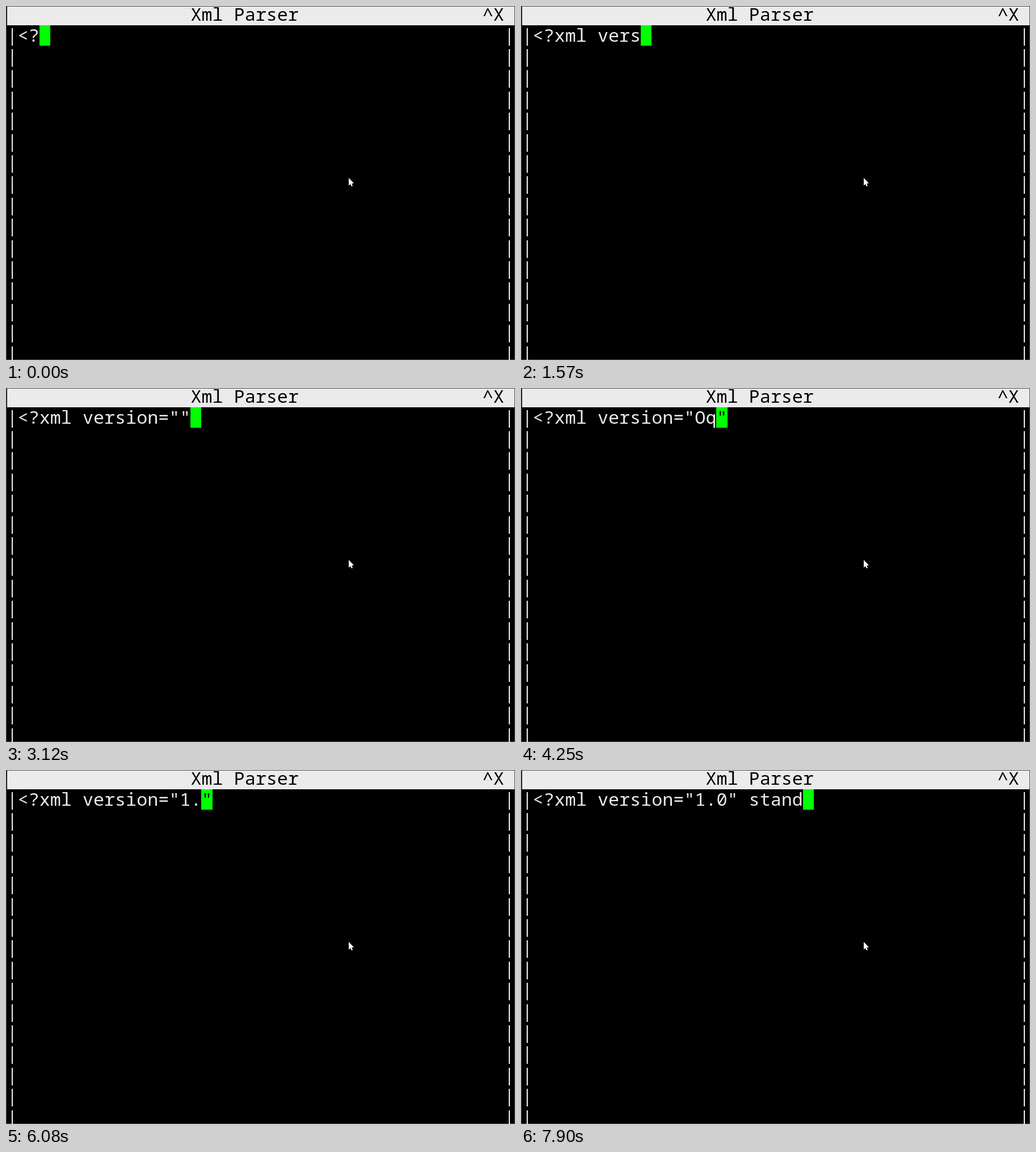
An HTML page with a canvas that plays this animation: 897 by 624 pixels, repeating every 8000 ms.

```html
<!DOCTYPE html>
<html lang="en">
<head>
<meta charset="utf-8">
<title>Xml Parser</title>
<style>
  html, body { margin: 0; width: 100%; height: 100%; overflow: hidden; background: #000; }
  canvas { display: block; }
</style>
</head>
<body>
<canvas id="stage" width="897" height="624"></canvas>
<script>
const ctx = document.getElementById('stage').getContext('2d', { alpha: false });
const LOOP = 8000;
const FONT_SIZE = 31.75;
const CELL_W = FONT_SIZE * 0.6;
const CELL_H = 37.4;
const LEFT = 20.6;
const BASELINE = 25.6;
const HIDDEN = -1;

// [start time, typed text, cursor column]
const states = [
  [0, '<?', 2],
  [430, '<?x', HIDDEN],
  [580, '<?xm', 4],
  [710, '<?xml', 5],
  [860, '<?xml ', HIDDEN],
  [990, '<?xml ', 6],
  [1140, '<?xml v', 7],
  [1270, '<?xml ve', 8],
  [1410, '<?xml ver', 9],
  [1570, '<?xml vers', 10],
  [1730, '<?xml versio', HIDDEN],
  [1880, '<?xml versio', 12],
  [2030, '<?xml version', 13],
  [2570, '<?xml version=', 14],
  [3120, '<?xml version=""', 16],
  [3540, '<?xml version=""', 15],
  [4110, '<?xml version="Oq', HIDDEN],
  [4250, '<?xml version="Oq"', 17],
  [4530, '<?xml version="Oq."', 18],
  [5250, '<?xml version="Oq"', 17],
  [5380, '<?xml version=""', 15],
  [5930, '<?xml version="1', HIDDEN],
  [6080, '<?xml version="1."', 17],
  [6210, '<?xml version="1.0"', 18],
  [6780, '<?xml version="1.0"', 19],
  [6910, '<?xml version="1.0" ', HIDDEN],
  [7040, '<?xml version="1.0" ', 20],
  [7450, '<?xml version="1.0" s', 21],
  [7600, '<?xml version="1.0" sta', 23],
  [7740, '<?xml version="1.0" stan', 24],
  [7900, '<?xml version="1.0" stand', 25]
];

const columnX = col => LEFT + col * CELL_W;

function rect(x, y, w, h, color) {
  ctx.fillStyle = color;
  ctx.fillRect(x, y, w, h);
}

function print(text, col, row, color) {
  ctx.fillStyle = color;
  ctx.fillText(text, columnX(col), BASELINE + row * CELL_H);
}

function drawWindow() {
  rect(0, 0, 897, 624, '#000');
  ctx.strokeStyle = '#4a4a4a';
  ctx.lineWidth = 1;
  ctx.strokeRect(0.5, 0.5, 896, 623);
  rect(2, 1, 894, 33, '#ebebeb');
  print('Xml Parser', 16, 0, '#000');
  print('^X', 43, 0, '#000');
  for (let row = 1; row <= 16; row++) {
    const y = Math.round(1.2 + row * CELL_H);
    rect(10, y, 2, 31, '#f0f0f0');
    rect(886, y, 2, 31, '#f0f0f0');
  }
}

function drawPointer() {
  const outline = [[604, 303], [604, 316.5], [607, 314], [609, 318], [611, 317], [609.3, 313], [613, 312.5]];
  ctx.beginPath();
  outline.forEach(([x, y]) => ctx.lineTo(x, y));
  ctx.closePath();
  ctx.fillStyle = '#fff';
  ctx.fill();
}

function drawInput(text, cursor) {
  print(text, 0, 1, '#ebebeb');
  if (cursor === HIDDEN) return;
  const x = Math.round(columnX(cursor));
  rect(x, 34, Math.round(columnX(cursor + 1)) - x, 36, '#0f0');
  if (text[cursor]) print(text[cursor], cursor, 1, '#000');
}

function draw(now) {
  const time = now % LOOP;
  const [, text, cursor] = states.findLast(([start]) => start <= time);
  ctx.font = `${FONT_SIZE}px "Noto Sans Mono", monospace`;
  drawWindow();
  drawInput(text, cursor);
  drawPointer();
  requestAnimationFrame(() => draw(performance.now()));
}

draw(0);
</script>
</body>
</html>
```
